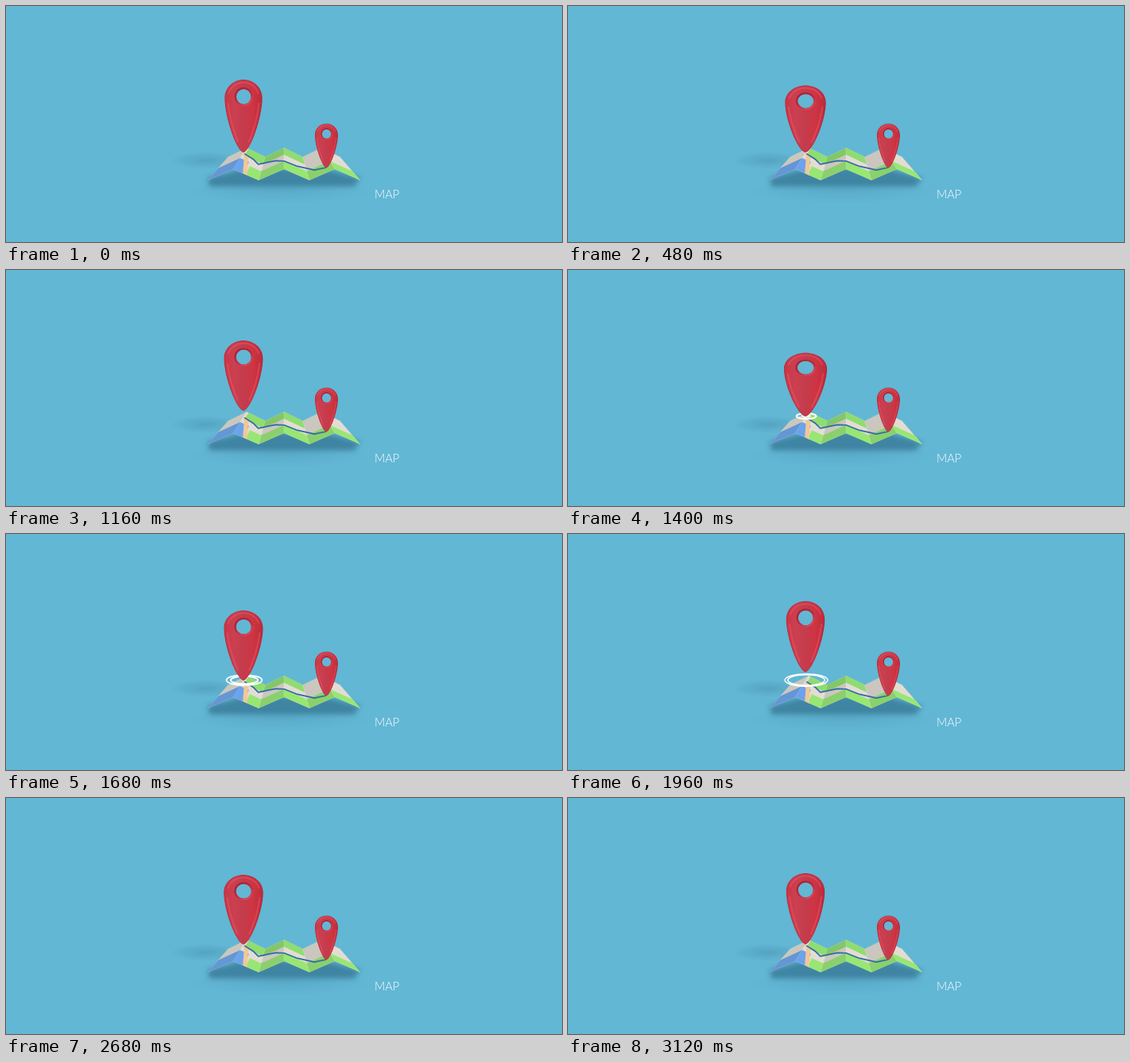
Write an HTML page with a canvas that moves like this. It is 700 by 298 pixels and loops after 3200 ms.

```html
<!DOCTYPE html>
<html lang="en">
<head>
<meta charset="utf-8">
<title>Map</title>
<style>
html, body { margin: 0; width: 100%; height: 100%; overflow: hidden; background: #62b7d4; }
canvas { display: block; width: 700px; height: 298px; }
</style>
</head>
<body>
<canvas id="stage" width="700" height="298"></canvas>
<script>
const ctx = document.getElementById('stage').getContext('2d');
const LOOP = 3200, STEP = 40, GROUND = 185, REST = 92, FOLDS = 6;

// The pin dips before each hop, leaves stretched and lands a little flat
const hops = [
  { start: 800, end: 1191, rise: 24, dip: 8, stretch: 99, land: 88 },
  { start: 1720, end: 2030, rise: 15, dip: 8, stretch: 92, land: 89 },
  { start: 2340, end: 2510, rise: 4.5, dip: 5.5, stretch: 92, land: 90 },
  { start: LOOP, end: LOOP, rise: 0, dip: 3, stretch: REST, land: REST }
];

const mix = (a, b, k) => a + (b - a) * k;
const clamp = v => Math.max(0, Math.min(1, v));

function pose(t) {
  let from = 0, height = REST;
  for (const hop of hops) {
    if (t < hop.start) {
      const k = (t - from) / (hop.start - from);
      return { lift: 0, height: mix(height, hop.stretch, k ** 6) - hop.dip * Math.sin(Math.PI * k) };
    }
    if (t < hop.end) {
      const k = (t - hop.start) / (hop.end - hop.start);
      return { lift: 4 * hop.rise * k * (1 - k), height: mix(hop.stretch, hop.land, k) };
    }
    from = hop.end;
    height = hop.land;
  }
  return { lift: 0, height: REST };
}

function gradient(x0, y0, x1, y1, colors) {
  const g = ctx.createLinearGradient(x0, y0, x1, y1);
  colors.forEach((c, i) => g.addColorStop(i / (colors.length - 1), c));
  return g;
}

function trace(points) {
  ctx.beginPath();
  points.forEach(p => ctx.lineTo(...p));
}

function poly(points, fill) {
  trace(points);
  ctx.closePath();
  ctx.fillStyle = fill;
  ctx.fill();
}

function line(points, color, width) {
  trace(points);
  ctx.strokeStyle = color;
  ctx.lineWidth = width;
  ctx.stroke();
}

// Point on the folded sheet: u counts folds from the left, v runs back to front
function at(u, v) {
  const ridge = 1 - Math.abs((u % 2) - 1);
  const x = 350 + (u - FOLDS / 2) * mix(23.5, 32, v);
  return [x, mix(mix(190.5, 179, ridge), mix(220, 206, ridge), v)];
}

// Coloured area of the sheet, bent at every fold
function patch(u0, u1, v0, v1, fill) {
  const us = [u0];
  for (let u = Math.floor(u0) + 1; u < u1; u++) us.push(u);
  us.push(u1);
  poly([...us.map(u => at(u, v0)), ...us.reverse().map(u => at(u, v1))], fill);
}

function softShadow(x, y, rx, ry, alpha) {
  ctx.save();
  ctx.translate(x, y);
  ctx.scale(rx, ry);
  const g = ctx.createRadialGradient(0, 0, 0, 0, 0, 1);
  g.addColorStop(0, `rgba(35,95,125,${alpha})`);
  g.addColorStop(1, 'rgba(35,95,125,0)');
  ctx.fillStyle = g;
  ctx.fillRect(-1, -1, 2, 2);
  ctx.restore();
}

function drawMap() {
  softShadow(252, 195, 45, 11, 0.22);
  softShadow(345, 233, 120, 16, 0.12);
  ctx.save();
  ctx.filter = 'blur(3px)';
  poly([[254, 217], [300, 205], [400, 205], [446, 217], [438, 228], [256, 228]], 'rgba(40,100,130,.6)');
  ctx.restore();

  patch(0, FOLDS, 0, 1, '#e3dcd3');
  patch(0, 1.4, 0.48, 1, '#6ba3ec');
  patch(1.1, 4, 0, 0.32, '#8fdc70');
  patch(1.5, FOLDS, 0.62, 1, '#98e674');
  poly([at(1.05, 0.25), at(1.25, 0.25), at(1.55, 1), at(1.38, 1)], '#f0c896');

  for (let u = 0; u < FOLDS; u += 2) patch(u, u + 1, 0, 1, 'rgba(60,80,70,.15)');
  for (let u = 1; u < FOLDS; u++) line([at(u, 0), at(u, 1)], 'rgba(255,255,255,.2)', 0.8);

  const route = [[1.05, 0.25], [1.5, 0.3], [1.8, 0.4], [2.6, 0.42], [3, 0.62], [3.6, 0.58], [4.3, 0.7], [4.75, 0.8]];
  ctx.lineJoin = 'round';
  line(route.map(p => at(...p)), '#2d6ba6', 1.7);
}

function pinPath() {
  ctx.beginPath();
  ctx.moveTo(0, 0);
  for (const side of [-1, 1]) {
    ctx.moveTo(0, 0);
    ctx.bezierCurveTo(side * 9, -2, side * 23.7, -45, side * 23.7, -68.5);
    ctx.bezierCurveTo(side * 23.7, -82, side * 13, -92, 0, -92);
  }
}

function oval(x, y, rx, ry) {
  ctx.moveTo(x + rx, y);
  ctx.ellipse(x, y, rx, ry, 0, 0, Math.PI * 2);
}

function drawPin(x, y, sx, sy) {
  ctx.save();
  ctx.translate(x, y);
  ctx.scale(sx, sy);
  pinPath();
  oval(0.2, -70.5, 9.2, 9.6);
  ctx.clip('evenodd');

  pinPath();
  ctx.fillStyle = gradient(-23, 0, 23, 0, ['#cb3545', '#cb4050', '#c43c4c', '#cf3442', '#bb2c3b']);
  ctx.fill();
  ctx.strokeStyle = 'rgba(165,30,48,.4)';
  ctx.lineWidth = 2;
  ctx.stroke();

  // Gloss along both flanks and over the head
  ctx.lineCap = 'round';
  ctx.lineWidth = 2;
  ctx.strokeStyle = 'rgba(235,95,112,.4)';
  for (const side of [-1, 1]) {
    ctx.beginPath();
    ctx.moveTo(side * 19.5, -62);
    ctx.quadraticCurveTo(side * 17, -38, side * 7, -14);
    ctx.stroke();
  }
  ctx.beginPath();
  ctx.arc(0, -69, 19.5, Math.PI * 1.1, Math.PI * 1.9);
  ctx.stroke();

  // Rim of the hole
  ctx.beginPath();
  oval(0.2, -70.5, 10.3, 10.7);
  ctx.strokeStyle = gradient(-7, -81, 7, -60, ['#a52337', '#b52c3f', '#d94c5c']);
  ctx.lineWidth = 2.4;
  ctx.stroke();
  ctx.restore();
}

function drawRing(t, start, reach) {
  const p = (t - start) / 1200;
  if (p <= 0 || p >= 1) return;
  const r = reach * (1 - (1 - p) ** 3);
  ctx.globalAlpha = clamp(p * 12) * clamp((1 - p) * 5);
  ctx.beginPath();
  oval(300, 184.5, r, r * 0.29);
  ctx.strokeStyle = '#fff';
  ctx.lineWidth = mix(2.2, 1, p);
  ctx.stroke();
  ctx.globalAlpha = 1;
}

function draw(t) {
  ctx.fillStyle = '#62b7d4';
  ctx.fillRect(0, 0, 700, 298);
  drawMap();
  drawRing(t, 1190, 28.3);
  drawRing(t, 1320, 26);
  const { lift, height } = pose(t);
  const s = height / REST;
  drawPin(299, GROUND - lift, 1 / s, s);
  drawPin(403.4, 204.5, 0.615, 0.61);
  ctx.fillStyle = '#fff';
  ctx.font = '300 14.6px Lato, sans-serif';
  ctx.fillText('MAP', 464, 243);
}

const begin = performance.now();
function frame() {
  const t = (performance.now() - begin) % LOOP;
  draw(Math.min(3120, Math.floor(t / STEP) * STEP));
  requestAnimationFrame(frame);
}
frame();
</script>
</body>
</html>
```
